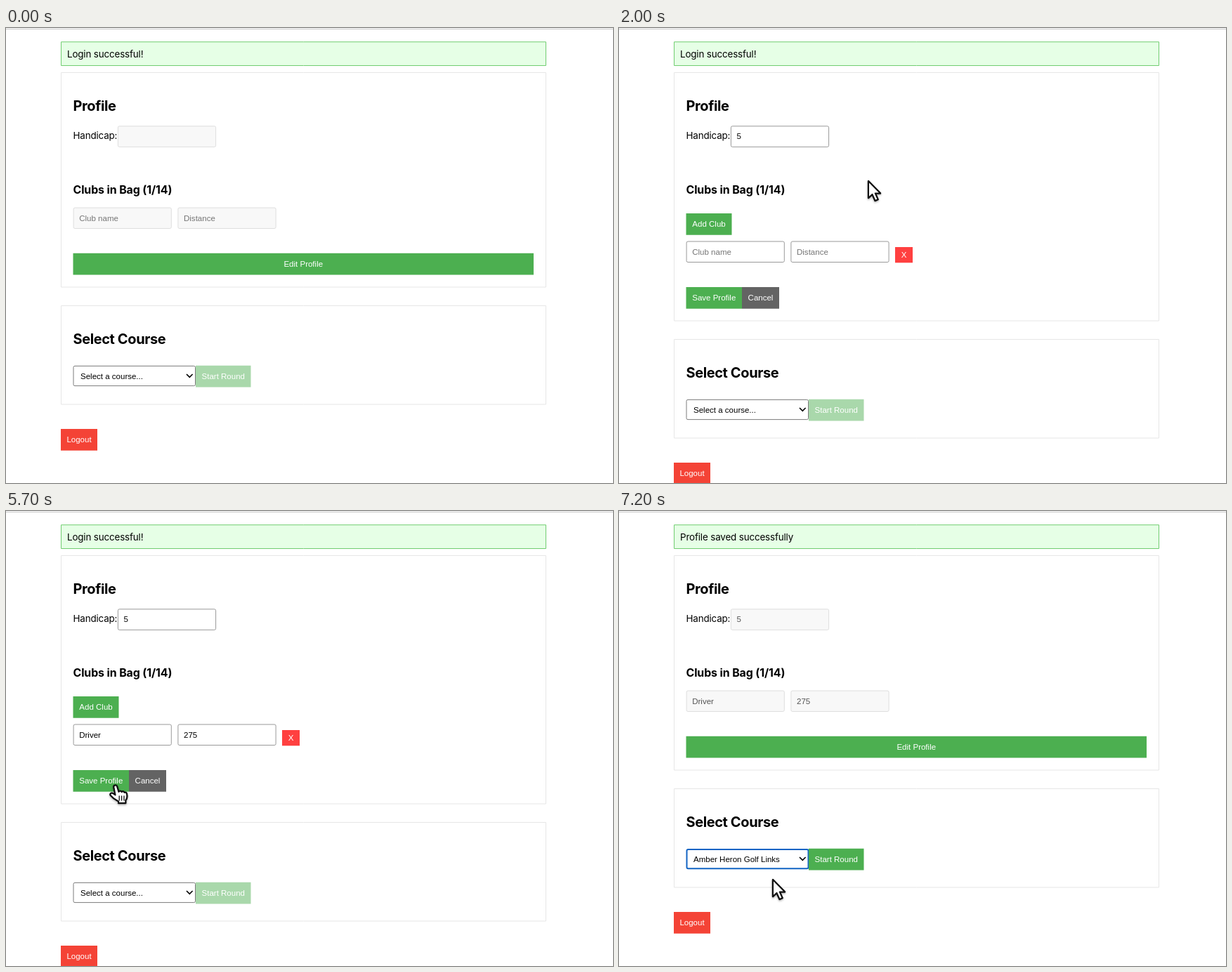
These frames come from a looping animation (864x648 px, 7.85 s). An HTML page with a canvas:

```html
<!DOCTYPE html>
<html lang="en">
<head>
<meta charset="utf-8">
<title>Golf profile form</title>
<style>
html, body { margin: 0; width: 100%; height: 100%; overflow: hidden; background: #fff; }
canvas { display: block; }
</style>
</head>
<body>
<canvas id="stage" width="864" height="648"></canvas>
<script>
const ctx = document.getElementById('stage').getContext('2d');
const LOOP = 7850, STEP = 100;
const GREEN = '#4caf50', RED = '#f44336', BLUE = '#1264c4';
const UI = '11.52px "Liberation Sans", Arial, sans-serif';
const BODY = '13.4px Inter, sans-serif';
const MENU = '11.2px Inter, sans-serif';
const COURSES = ['Select a course...', 'Tarnwick Hollow Golf Club', 'Amber Heron Golf Links', 'Fernley Dunes Old Course'];

// Pointer moves: start, end, target x, target y
const MOVES = [
  [200, 500, 238, 345], [800, 1100, 221, 160], [1500, 1900, 355, 218],
  [2200, 2700, 149, 319], [3900, 4100, 312, 322], [5300, 5600, 156, 391],
  [5700, 5800, 155, 388], [6100, 6500, 229, 489], [6700, 6900, 219, 525]
];

const SHAPES = {
  arrow: new Path2D('M0 0V24L5.5 18.9L9.6 28L13.6 26.2L9.7 17.4H17Z'),
  hand: new Path2D('M-2.6 2.2C-3 -.6 1 -1.4 2 1.2L4.4 9Q7 6.6 8.6 9.2Q11 7.2 12.6 10Q15.4 9 16 12.4Q17 18 14.2 21V25H4.2V22.6L-3 18L-7.4 13.6C-8 10.6 -5 10 -3.4 11.4L-.4 13.4Z'),
  beam: new Path2D('M-5.5 -12.5Q0 -12.5 0 -8Q0 -12.5 5.5 -12.5M0 -9V9M-5.5 12.5Q0 12.5 0 8Q0 12.5 5.5 12.5M-3.5 3H3.5')
};
const FINGERS = new Path2D('M5.2 15V21M8.6 15V21M12 15V21');

let time, pointer, cursor;

const within = (from, to) => time >= from && time < to;
const typed = (text, times) => text.slice(0, times.filter(t => time >= t).length);

function pointerAt(t) {
  let x = 65, y = 405;
  for (const [start, end, toX, toY] of MOVES) {
    if (t <= start) break;
    const p = Math.min(1, (t - start) / (end - start));
    const eased = p * p * (3 - 2 * p);
    x += (toX - x) * eased;
    y += (toY - y) * eased;
  }
  return { x, y };
}

const over = (x, y, w, h) =>
  pointer.x >= x && pointer.x <= x + w && pointer.y >= y && pointer.y <= y + h;

function text(str, x, y, font = UI, color = '#000', align = 'left', spacing = 0) {
  ctx.font = font;
  ctx.fillStyle = color;
  ctx.textAlign = align;
  ctx.letterSpacing = spacing + 'px';
  ctx.fillText(str, x, y);
}

function box(x, y, w, h, fill, stroke, line = 1, radius = 0) {
  ctx.beginPath();
  ctx.roundRect(x, y, w, h, radius);
  if (fill) { ctx.fillStyle = fill; ctx.fill(); }
  if (stroke) { ctx.strokeStyle = stroke; ctx.lineWidth = line; ctx.stroke(); }
}

const heading = (str, y) => text(str, 95.5, y, 'bold 20px Inter, sans-serif', '#000', 'left', -.4);

function button(label, x, y, w, h = 30.7, fill = GREEN, enabled = true) {
  box(x, y, w, h, fill);
  text(label, x + w / 2, y + h / 2 + 4, UI, '#fff', 'center');
  if (enabled && over(x, y, w, h)) cursor = 'beam' && 'hand';
}

function spinner(x, y) {
  box(x - 6, y - 6.5, 12, 13, '#eee');
  ctx.fillStyle = '#444';
  for (const dir of [-1, 1]) {
    ctx.beginPath();
    ctx.moveTo(x - 4, y + dir * 1.3);
    ctx.lineTo(x + 4, y + dir * 1.3);
    ctx.lineTo(x, y + dir * 5);
    ctx.fill();
  }
}

function field({ x, y, value, placeholder = '', enabled, focused, caret, numeric }) {
  const w = 140, h = 30.5, hovered = enabled && over(x, y, w, h);
  if (focused) box(x + .5, y + .8, w - 1, h - 1.6, '#fff', BLUE, 2, 2);
  else box(x + .4, y + .5, w - .8, h - 1, enabled ? '#fff' : '#f8f8f8', enabled ? '#999' : '#dedede', 1, 2);
  const color = !value ? '#757575' : enabled ? '#000' : '#545454';
  text(value || placeholder, x + 8.5, y + 19, UI, color);
  if (focused && caret) {
    const width = value ? ctx.measureText(value).width : 0;
    box(x + 8.5 + width, y + 8.7, 1.1, 13, '#000');
  }
  if (numeric && (hovered || focused)) spinner(x + w - 15, y + 15);
  if (hovered) cursor = 'beam';
}

function drawProfile(editing) {
  const caret = !within(3100, 3300) && !within(4000, 4200) && !within(5200, 5700);
  const rowY = editing ? 303.5 : 255.5;
  box(78.5, 63.5, 690, editing ? 353.5 : 305.5, null, '#e6e6e6');
  heading('Profile', 118);
  text('Handicap:', 95.5, 158, BODY, '#000', 'left', -.15);
  field({
    x: 159, y: 139.3, value: typed('5', [1500]), enabled: editing, numeric: true,
    focused: within(1200, 2000), caret
  });
  text('Clubs in Bag (1/14)', 95.5, 236, 'bold 15.9px Inter, sans-serif', '#000', 'left', -.1);
  field({
    x: 95.7, y: rowY, value: typed('Driver', [3300, 3400, 3500, 3600, 3700, 3800]),
    placeholder: 'Club name', enabled: editing, focused: within(2800, 4200), caret
  });
  field({
    x: 244.5, y: rowY, value: typed('275', [4400, 4800, 4900]), placeholder: 'Distance',
    enabled: editing, numeric: true, focused: within(4200, 5700), caret
  });
  if (editing) {
    button('Add Club', 95.5, 264, 65);
    button('X', 393, 312, 25, 22.3, '#ff4040');
    button('Save Profile', 95.5, 369, 79.5);
    button('Cancel', 175, 369, 53, 30.7, '#636363');
  } else {
    button('Edit Profile', 95.5, 320.8, 655.5);
  }
}

function drawCourse(top, chosen) {
  box(78.5, top + .5, 690, 140.5, null, '#e6e6e6');
  heading('Select Course', top + 55);
  if (chosen) box(96.5, top + 87, 173, 27.2, '#fff', BLUE, 2, 2);
  else box(96, top + 86.4, 173.5, 28.2, '#fff', '#7c7c7c', 1, 2);
  text(COURSES[chosen], 106, top + 104.5);
  ctx.beginPath();
  ctx.moveTo(257, top + 98);
  ctx.lineTo(261.3, top + 102.4);
  ctx.lineTo(265.6, top + 98);
  ctx.strokeStyle = '#000';
  ctx.lineWidth = 1.6;
  ctx.stroke();
  button('Start Round', 270, top + 85.8, 78.5, 30.7, chosen ? GREEN : '#a9d8ab', chosen > 0);
}

function withShadow(alpha, blur, dy, draw) {
  ctx.save();
  ctx.shadowColor = `rgba(0,0,0,${alpha})`;
  ctx.shadowBlur = blur;
  ctx.shadowOffsetY = dy;
  draw();
  ctx.restore();
}

function drawMenu() {
  const top = 486, rowH = 19;
  const active = time < 7100 ? Math.floor((pointer.y - top) / rowH) : -1;
  withShadow(.3, 8, 2, () => box(88, 481.5, 185, 85, '#f2f2f2', null, 0, 5));
  COURSES.forEach((name, i) => {
    const y = top + i * rowH, color = i === active ? '#fff' : '#222';
    if (i === active) box(93, y, 175, rowH, '#3c84f6', null, 0, 4);
    text(name, 106, y + 13.5, MENU, color);
    if (i) return;
    ctx.strokeStyle = color;
    ctx.lineWidth = 1.4;
    ctx.stroke(new Path2D('M96.5 496L99 499L103 492'));
  });
}

function drawPointer() {
  ctx.save();
  ctx.translate(pointer.x, pointer.y);
  ctx.lineJoin = ctx.lineCap = 'round';
  const shape = SHAPES[cursor];
  const stroke = (path, color, width) => {
    ctx.strokeStyle = color;
    ctx.lineWidth = width;
    ctx.stroke(path);
  };
  if (cursor === 'beam') {
    withShadow(.35, 3, 1.5, () => stroke(shape, '#222', 4.6));
    stroke(shape, '#fff', 1.6);
  } else {
    withShadow(.35, 3, 1.5, () => stroke(shape, '#111', 2.4));
    ctx.fillStyle = '#fff';
    ctx.fill(shape);
    stroke(shape, '#111', 2);
    if (cursor === 'hand') stroke(FINGERS, '#111', 1.3);
  }
  ctx.restore();
}

function drawClickRing() {
  const ring = new Path2D();
  ring.arc(pointer.x - 4.5, pointer.y - 6.5, 38, 0, Math.PI * 2);
  for (const [color, width] of [['#fff', 4], ['#111', 1.9]]) {
    ctx.strokeStyle = color;
    ctx.lineWidth = width;
    ctx.stroke(ring);
  }
}

function draw() {
  const editing = within(800, 5800);
  const shift = editing ? 48 : 0;
  pointer = pointerAt(time);
  cursor = 'arrow';
  box(0, 0, 864, 648, '#fff');
  box(0, 1, 864, 1, '#c8c8c8');
  box(78.5, 19.8, 690, 33.7, '#e6ffe6', '#70cd70');
  text(time < 5800 ? 'Login successful!' : 'Profile saved successfully', 87, 42, BODY, '#000', 'left', -.15);
  drawProfile(editing);
  drawCourse(395 + shift, time < 7200 ? 0 : 2);
  button('Logout', 78, 571 + shift, 52, 30.7, RED);
  if (within(6600, 7200)) drawMenu();
  const hidden = time < 200 || within(1500, 1600) || within(3300, 4000) || within(4500, 5400);
  if (!hidden) drawPointer();
  if (within(2800, 2900)) drawClickRing();
}

let start;
function tick(now) {
  start ??= now;
  time = Math.floor((now - start) % LOOP / STEP) * STEP;
  draw();
  requestAnimationFrame(tick);
}
requestAnimationFrame(tick);
</script>
</body>
</html>
```
